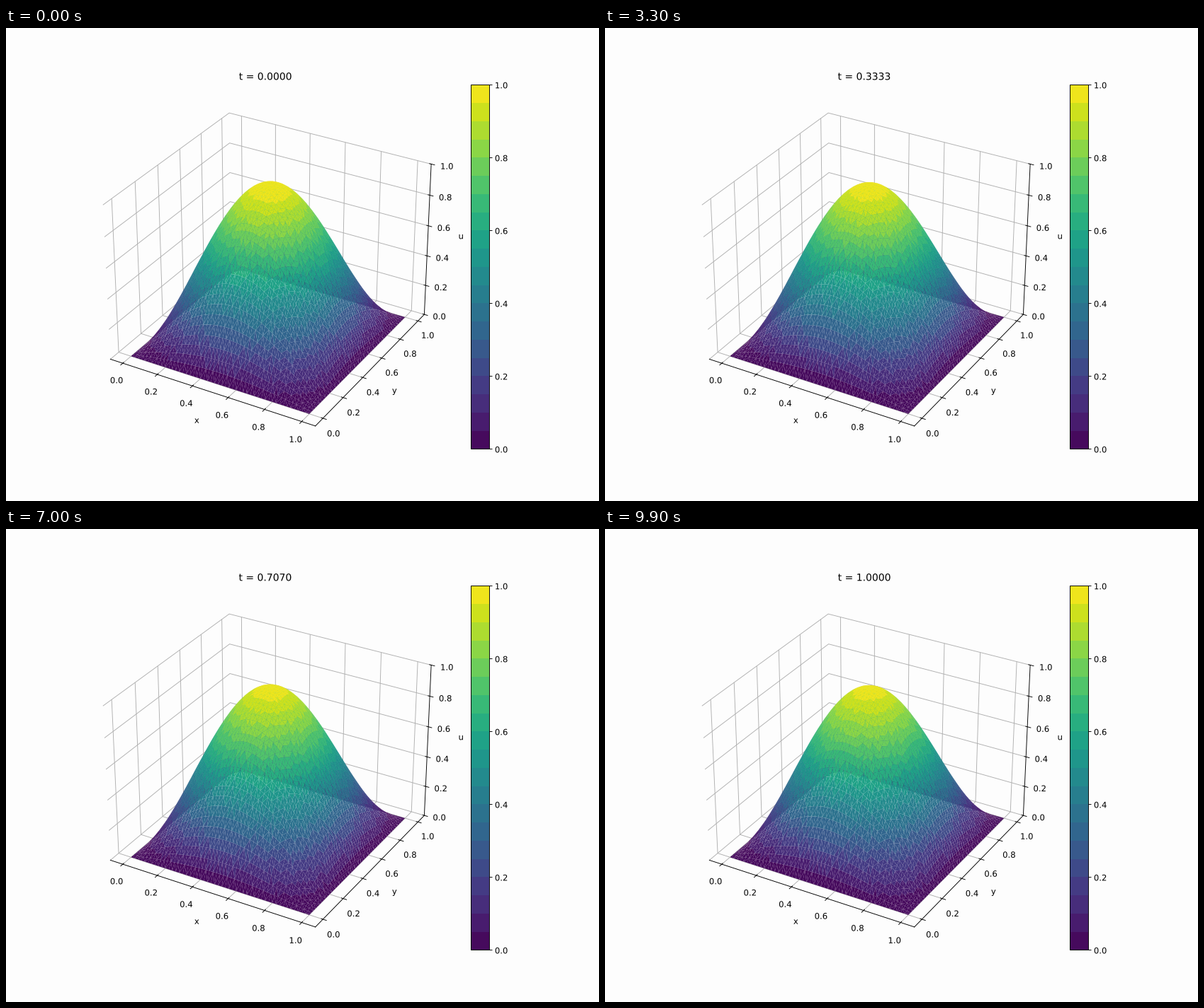
A matplotlib script for the animation above (10000 ms loop, 837 by 669 pixels).

```python
import numpy as np
import matplotlib.pyplot as plt
from matplotlib.animation import FuncAnimation
from matplotlib.cm import ScalarMappable
from matplotlib.collections import PathCollection
from matplotlib.colors import ListedColormap, Normalize
from matplotlib.path import Path
from matplotlib.patheffects import Normal
from matplotlib.text import Text
from matplotlib.tri import Triangulation
from mpl_toolkits.mplot3d import proj3d

WIDTH, HEIGHT, DPI = 837, 669, 83.7
FRAMES, INTERVAL = 100, 100
CELLS = 50          # mesh cells per side
BANDS = 20          # colour steps
ALPHA = 0.001       # diffusivity
PAPER = "#fdfdfd"

plt.rcParams["font.family"] = "DejaVu Sans"
fig = plt.figure(figsize=(WIDTH / DPI, HEIGHT / DPI), dpi=DPI, facecolor=PAPER)
ax = fig.add_subplot(projection="3d", facecolor=PAPER)

# data margin of 5 % plus the usual 1/48 view margin
low = -0.05 - 1.1 / 48
ax.set(xlim=(low, 1 - low), ylim=(low, 1 - low), zlim=(0, 1),
       xlabel="x", ylabel="y", zlabel="u")
for axis in (ax.xaxis, ax.yaxis, ax.zaxis):
    axis.pane.set_visible(False)

cmap = ListedColormap(plt.cm.viridis((np.arange(BANDS) + 0.5) / BANDS))
mapper = ScalarMappable(Normalize(0, 1), cmap)
fig.colorbar(mapper, ax=ax)
title = ax.set_title("")

side = np.linspace(0, 1, CELLS + 1)
x, y = (g.ravel() for g in np.meshgrid(side, side))
tris = Triangulation(x, y).triangles
bump = np.sin(np.pi * x) * np.sin(np.pi * y)
view = ax.get_proj()

# paint far triangles first
depth = np.asarray(proj3d.proj_transform(x, y, bump, view)[2])
tris = tris[np.argsort(-depth[tris].mean(axis=1))]
loops = tris[:, [0, 1, 2, 0]]

# every path is a view into verts, so updating verts moves the surface
verts = np.zeros((len(tris), 4, 2))
codes = [Path.MOVETO, Path.LINETO, Path.LINETO, Path.CLOSEPOLY]
surface = PathCollection([Path(v, codes) for v in verts], edgecolors="none",
                         linewidths=0, transform=ax.transData, zorder=1)
fig.add_artist(surface)

# outlined text keeps its sub-pixel position; ticks exist after one draw
fig.canvas.draw()
for text in fig.findobj(Text):
    text.set_path_effects([Normal()])


def update(k):
    t = k * 10000 // (FRAMES - 1) / 10000
    u = bump * np.exp(-2 * np.pi ** 2 * ALPHA * t)
    px, py, _ = proj3d.proj_transform(x, y, u, view)
    verts[:] = np.stack([px, py], axis=-1)[loops]
    surface.set_facecolor(mapper.to_rgba(u[tris].mean(axis=1)))
    title.set_text(f"t = {t:.4f}")
    return surface, title


anim = FuncAnimation(fig, update, frames=FRAMES, interval=INTERVAL,
                     init_func=lambda: update(0), repeat=True, repeat_delay=0)
plt.show()
```
